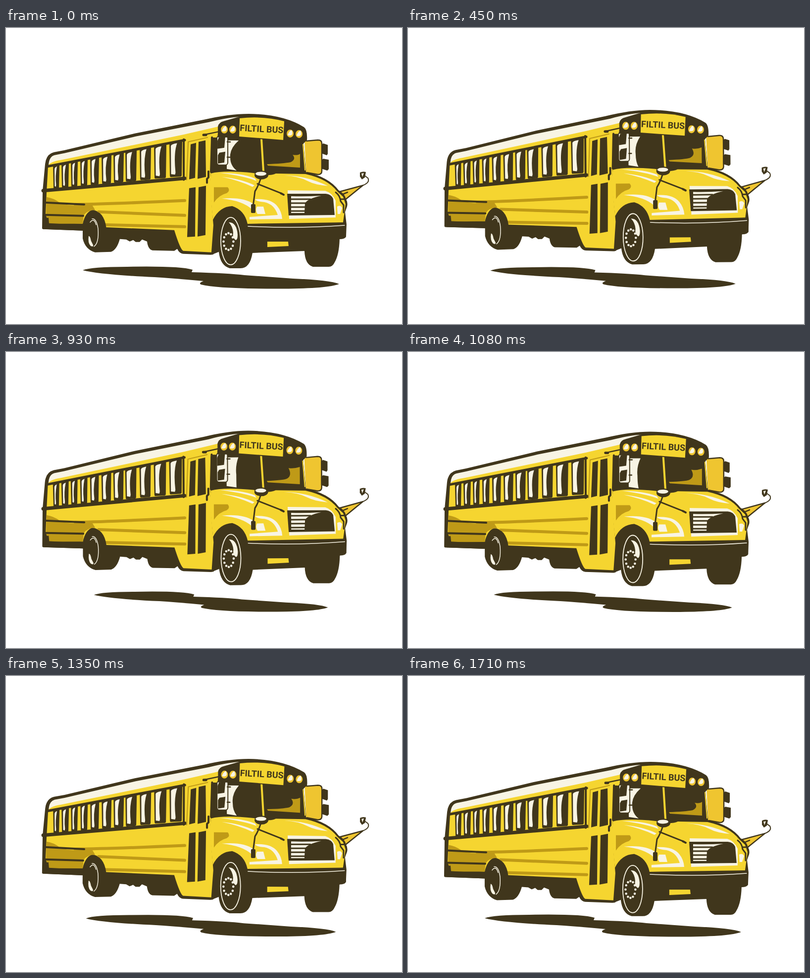
Animation of 800 by 600 pixels, one loop 1.74 s. Source, as an HTML page:

```html
<!DOCTYPE html>
<html lang="en">
<head>
<meta charset="utf-8">
<title>Bouncing bus</title>
<style>
  html, body { margin: 0; width: 100%; height: 100%; overflow: hidden; background: #fff; }
  svg { display: block; width: 800px; height: 600px; }
  .d { fill: #40361c; }
  .y { fill: #f5d530; }
  .a { fill: #efc530; }
  .o { fill: #bf9a17; }
  .c { fill: #f8f4e4; }
  .ld, .lo, .lc, .ly { fill: none; stroke-linecap: round; stroke-linejoin: round; }
  .ld { stroke: #40361c; }
  .lo { stroke: #bf9a17; }
  .lc { stroke: #f8f4e4; }
  .ly { stroke: #f5d530; }
  text { font: 700 18px Roboto, "Open Sans", sans-serif; text-anchor: middle; }
</style>
</head>
<body>
<svg viewBox="0 0 800 600">
  <path id="shadow" class="d" d="M155 491Q172 484 245 484Q350 482 377 490L375 495Q450 497 482 501L580 508Q655 511 673 519Q650 528 560 528.500Q430 529 394 520Q388 517 399 513Q345 508 300 505Q190 500 155 491Z"/>
  <g id="bus">
    <!-- stop arm and far mirror -->
    <path class="a" d="M674 332L720 320L684 349Z"/>
    <path class="ld" stroke-width="2.500" d="M673 332L721 319L684 349M673 340L690 333"/>
    <path class="ld" stroke-width="2" d="M721 319Q736 313 731 304L724 299"/>
    <path class="d" d="M715 293Q721 290 727 292L725 303L719 307L715 301Z"/>
    <path class="c" d="M718 295L723 294L720 302Z"/>
    <path class="a" d="M603 229L630 227Q638 227 638 234V290Q638 297 630 297L606 292Z"/>
    <path class="ld" stroke-width="2.500" d="M607 229L630 227Q638 227 638 234V290Q638 297 630 297L608 293"/>
    <path class="d" d="M637 237L641 234L650 237V255L648 258L637 254ZM637 268L641 265L652 267V286L649 289L637 285Z"/>

    <!-- whole silhouette -->
    <path class="d" d="M73 407L74 330L79 276Q81 256 97 252L118 248L260 214L400 186Q450 174 490 174Q560 175 602 201Q609 206 608 227L601 234L606 292Q652 302 672 329Q684 335 687 347Q691 354 689 362L685 373L688 398L687 423Q685 428 674 428Q673 460 664 475Q660 484 652 484H620Q604 479 603 452L498 456Q493 487 474 487H452Q433 482 430 454L420 458Q419 460 413 460L358 458Q350 457 346 448L340 452L296 451Q287 449 285 433L275 429L270 434L262 434L257 430L250 433L243 429L230 428Q224 450 212 454L180 455Q160 449 155 427V411L78 408Z"/>

    <!-- roof and side -->
    <path class="c" d="M86 278Q87 261 98 258L118 254L262 220L410 191Q448 181 474 180L432 196L428 213L86 281Z"/>
    <path class="y" d="M85 279Q90 271 110 268L250 239L360 216L429 200L427 225L414 226V290L412 318L419 400L415 455L358 452Q352 449 340 410L199 404Q195 370 174 369Q160 374 155 397L86 394L80 378L82 333Z"/>
    <path class="o" d="M82 343Q96 345 108 354Q122 361 153 360L174 359L180 369Q163 370 157 380L155 397H85L81 378Z"/>
    <path class="lo" stroke-width="6" stroke-linecap="butt" d="M140 358Q210 357 361 350M187 373L361 380M193 399L361 403"/>
    <path class="ld" stroke-width="4" d="M78 354L158 358M78 379L156 381"/>
    <path class="d" d="M75 385H86L87 396L156 400V411L74 408Z"/>
    <path class="ld" stroke-width="7" stroke-linecap="butt" d="M75 330L361 305"/>
    <path class="ld" stroke-width="5" stroke-linecap="butt" d="M83 281L361 227.500"/>
    <path class="ld" stroke-width="4" stroke-linecap="butt" d="M359 226V308"/>
    <g id="windows"></g>

    <!-- door -->
    <path class="lo" stroke-width="2" d="M365 308L368 231L407 222"/>
    <path class="d" d="M373 236L384 233L382 304L370 307ZM389 231L403 228L404 302L387 306ZM370 325L383 323L382 423L366 424ZM389 323L404 320L403 420L387 423Z"/>
    <path class="ld" stroke-width="4" d="M416 222L414 292M409 291V303L406 306V314"/>
    <path class="ld" stroke-width="2.500" d="M398 217L431 210"/>
    <path class="ld" stroke-width="5" d="M399 217H404"/>

    <!-- windshield -->
    <path class="d" d="M415 222L600 228L606 296H415Z"/>
    <path id="glare" class="c"/>
    <path id="glow" class="o"/>
    <path class="ly" stroke-width="4" stroke-linecap="butt" d="M516 226L520 290"/>
    <path class="ly" stroke-width="2" d="M600 236L604 288"/>
    <rect class="c" x="426" y="219" width="22" height="59" rx="5"/>
    <rect class="ld" x="426" y="219" width="22" height="59" rx="5" stroke-width="2"/>
    <path class="d" d="M430 222L443 220L441 243L427 245V229ZM431 253L443 251L441 273L428 275V258Z"/>
    <path class="ld" stroke-width="2.500" d="M447 262H452M447 231H453"/>

    <!-- sign -->
    <path class="d" d="M428 200Q430 191 440 189L474 179Q550 176 597 200Q607 205 607 214V228L600 234L560 229L473 222L428 222Z"/>
    <path class="y" d="M472 183Q520 178 562 189L560 227L471 220Z"/>
    <text class="d" transform="translate(516 211) rotate(3)">FILTIL BUS</text>
    <g id="lamps"></g>

    <!-- hood -->
    <path class="y" d="M411 318L414 295Q440 288 500 294Q530 302 545 295L605 296Q650 306 669 331L681 342L686 357L681 394L488 397Q482 369 457 361Q431 362 418 389Z"/>
    <path class="c" d="M432 294Q475 294 503 305L506 310Q480 300 432 294ZM436 302Q475 306 502 319L498 322Q470 309 436 302ZM562 299Q606 299 650 320Q624 318 609 310Q590 300 562 299Z"/>
    <path class="o" d="M420 323H448Q454 330 446 335Q430 339 420 354Z"/>
    <path class="c" d="M436 346Q480 342 500 357L497 368Q478 350 436 346Z"/>
    <path class="c" d="M503 347Q535 345 548 361Q557 372 558 387L492 388V383L549 379Q542 357 522 353Q506 352 503 347Z"/>
    <path class="c" d="M507 362H520L524 377H508Q503 370 507 362Z"/>
    <path class="c" d="M569 329L645 330Q659 334 666 350V384L572 387V383Z"/>
    <path class="d" d="M568 336L646 336Q657 337 661 346L664 379L571 380Z"/>
    <path class="c" d="M576 341Q605 342 637 340Q608 346 604 356L603 375H576Z"/>
    <path class="ld" stroke-width="3" stroke-linecap="butt" d="M573 347H615M573 355H609M573 363H607M573 371H607"/>
    <path class="c" d="M669 362Q676 358 679 365L675 377H670Z"/>
    <path class="ld" stroke-width="3" d="M666 333Q675 340 676 351L682 359V374M676 347H686"/>
    <path class="ld" stroke-width="3" d="M515 304Q510 320 503 331L499 362M508 316L558 336"/>
    <path class="ld" stroke-width="4" d="M555 335L561 338"/>
    <rect class="d" x="495" y="357" width="9" height="18" rx="2"/>
    <ellipse class="d" cx="516" cy="298" rx="14" ry="9"/>
    <ellipse class="c" cx="515" cy="295.500" rx="11" ry="4"/>

    <!-- bumper and wheels -->
    <path class="d" d="M480 397Q580 400 687 394V423L674 428H486Z"/>
    <path class="lc" stroke-width="1.500" d="M489 402Q590 407 684 400"/>
    <path class="y" d="M528 433H570L571 442L528 444Z"/>
    <ellipse class="d" cx="457" cy="433" rx="28" ry="53"/>
    <ellipse class="lc" cx="454" cy="432" rx="20" ry="48" stroke-width="1.800"/>
    <path class="c" d="M450 394Q466 394 468 419Q468 430 464 430Q457 425 459 415Q458 402 450 394Z"/>
    <g id="bolts" class="c"></g>
    <ellipse class="d" cx="180" cy="413" rx="23" ry="41"/>
    <path class="lc" stroke-width="1.500" d="M174 387Q183 386 186 407Q188 436 178 443M170 394Q178 384 182 399"/>
    <path class="c" d="M167 422Q170 421 172 432L176 440Q177 445 171 442Q165 436 167 422Z"/>
  </g>
</svg>
<script>
  const LOOP = 1740, STEP = 30;
  const $ = id => document.getElementById(id);

  // side windows: left edge and width, heights follow the perspective
  const panes = [[95, 13], [112, 15], [131, 14], [150, 15], [170, 18], [193, 20],
                 [217, 21], [241, 23], [270, 23], [299, 25], [330, 26]];
  $("windows").innerHTML = panes.map(([x, w]) => {
    const top = 281 - (x - 84) * .2, bot = 327 - (x - 95) * .105, r = x + w;
    const tilt = w * .2;
    return `<path class="d" d="M${x} ${top}L${r} ${top - tilt}L${r - 1} ${bot - 3}Q${r - 2} ${bot - 1} ${r - 4} ${bot - 1}L${x + 3} ${bot}Q${x + 1} ${bot} ${x + 1} ${bot - 4}Z"/>
      <path class="c" d="M${x + 3} ${top + 8}Q${x + 3} ${top + 4} ${x + w * .6} ${top + 2}Q${x + w * .32} ${top + 22} ${x + w * .48} ${bot - 9}L${x + w * .44} ${bot - 5}L${x + 3.5} ${bot - 6}Z"/>`;
  }).join("");

  $("lamps").innerHTML = [[441, 206], [458, 206], [574, 214], [592, 215]].map(([x, y]) =>
    `<ellipse class="a" cx="${x}" cy="${y}" rx="7" ry="8"/>
     <path class="c" d="M${x - 5} ${y + 3}Q${x - 2} ${y - 6} ${x + 3} ${y - 7}Q${x + 6} ${y} ${x + 3} ${y + 3}Q${x - 2} ${y + 5} ${x - 5} ${y + 3}Z"/>`).join("");

  $("bolts").innerHTML = Array.from({ length: 12 }, (_, i) => {
    const a = i * Math.PI / 6;
    return `<circle cx="${449.5 + 10 * Math.cos(a)}" cy="${433 + 17 * Math.sin(a)}" r="2.300"/>`;
  }).join("");

  // 0 at rest, 1 at the given peak time
  const swing = (t, peak) => .5 + .5 * Math.cos((t - peak) / LOOP * 2 * Math.PI);

  function draw(now) {
    const t = Math.floor(now % LOOP / STEP) * STEP;
    const lift = swing(t, 840);
    const front = 15.5 * lift;
    const rear = 12.4 * swing(t, 960);   // the back end trails the front
    const tilt = (rear - front) / 520 * 180 / Math.PI;
    const size = 1 - .09 * swing(t, 845) ** 1.3;
    $("bus").setAttribute("transform", `translate(0 ${-rear}) rotate(${tilt} 80 340)`);
    $("shadow").setAttribute("transform", `translate(414 506) scale(${size}) translate(-414 -506)`);

    // reflections slide across the windshield as the bus rises
    const edge = 453 + 13 * lift, x = 579 - 8 * lift, y = 257 - 7 * lift;
    $("glare").setAttribute("d", `M446 228H470Q${edge - 2} 245 ${edge} 263Q${edge} 279 466 289L446 286Z`);
    $("glow").setAttribute("d", `M527 276Q560 275 ${x - 4} 272Q${x + 8} 266 ${x} ${y}Q${x + 10} ${y + 2} 594 ${y - 2}V283L529 279Z`);
  }

  const start = performance.now();
  function tick() {
    draw(performance.now() - start);
    requestAnimationFrame(tick);
  }
  tick();
</script>
</body>
</html>
```
